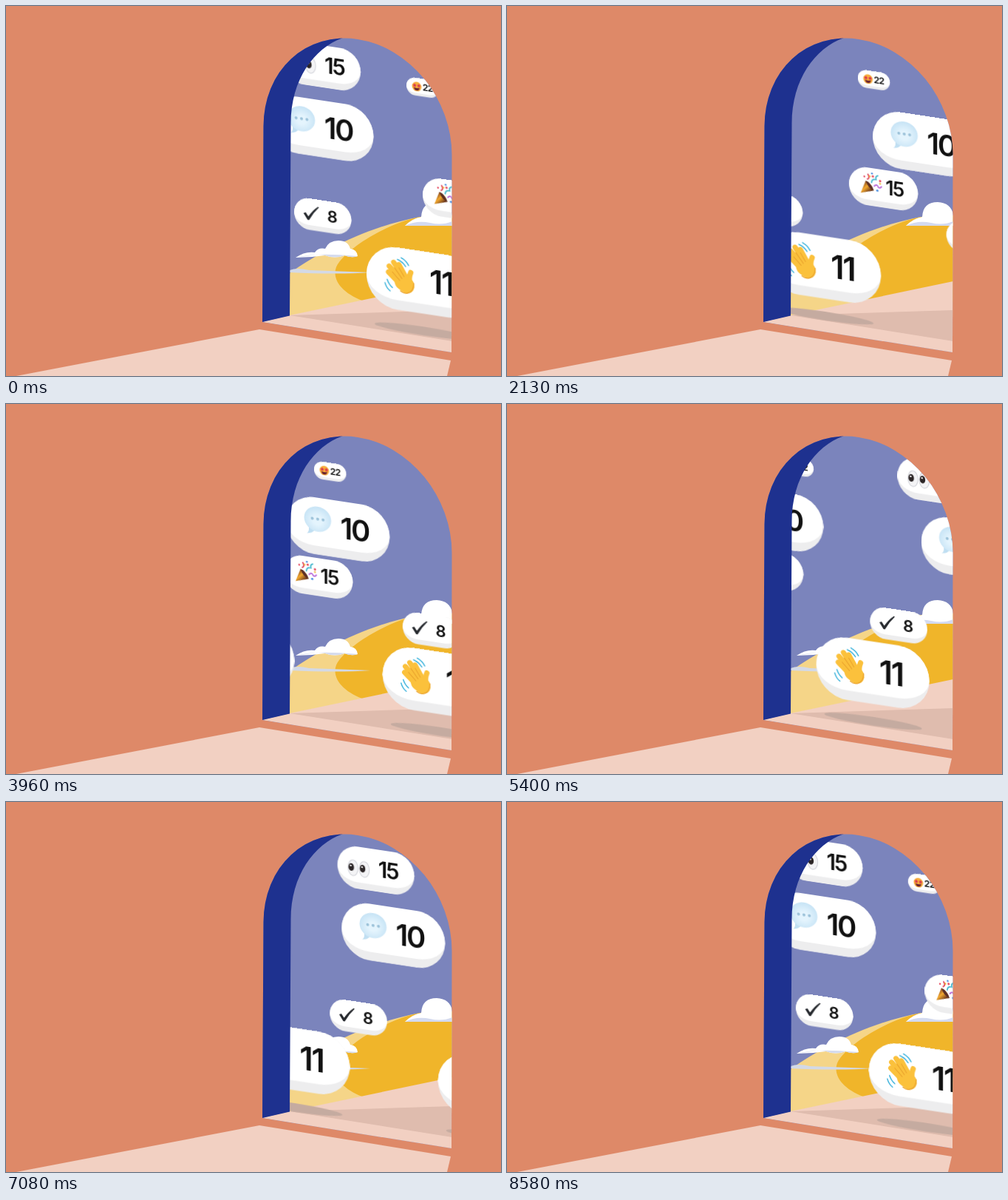
Recreate the animation shown at these times as an HTML page. Size 670 by 500 pixels, loop 8610 ms.

```html
<!DOCTYPE html>
<html lang="en">
<head>
<meta charset="utf-8">
<title>Reactions behind the arch</title>
<style>
  html, body { margin: 0; width: 100%; height: 100%; overflow: hidden; background: #de8968; }
  svg { display: block; width: 670px; height: 500px; }
  text { font: 600 43.5px Inter, "Liberation Sans", sans-serif; letter-spacing: -2.5px; text-anchor: middle; fill: #111; }
  .drift { animation: drift linear infinite; }
  @keyframes drift { to { transform: translateX(var(--shift)); } }
</style>
</head>
<body>
<svg viewBox="0 0 670 500">
  <defs>
    <clipPath id="arch">
      <path transform="matrix(1 .151 0 1 0 0)" d="M347 374.600L348.500 110A127.500 137 0 0 1 603.500 110L603 377Z"/>
    </clipPath>
    <radialGradient id="puff" cx=".5" cy=".55" r=".55">
      <stop offset=".3" stop-color="#e4f4fd"/>
      <stop offset="1" stop-color="#c6e3f5"/>
    </radialGradient>
    <linearGradient id="cone" x1="0" y1="0" x2="1" y2="1">
      <stop offset=".2" stop-color="#8a4b1c"/>
      <stop offset=".45" stop-color="#f3a92f"/>
      <stop offset=".75" stop-color="#6f3a1b"/>
    </linearGradient>

    <g id="pill">
      <rect width="153" height="84" rx="42" fill="#ededee"/>
      <path d="M0 42A42 42 0 0 1 42 0H111A42 42 0 0 1 153 42A42 29 0 0 1 111 71H42A42 29 0 0 1 0 42Z" fill="#fff"/>
    </g>

    <g id="eyes" transform="translate(42 43.500)">
      <g id="eye">
        <ellipse cx="-11" rx="10" ry="15.500" fill="#f4f4f6" stroke="#d3d4da" stroke-width="1.500"/>
        <ellipse cx="-14.500" cy="-1" rx="5.500" ry="7.500" fill="#2b2526"/>
        <circle cx="-15.500" cy="-4" r="1.800" fill="#fff"/>
      </g>
      <use href="#eye" x="22.500"/>
    </g>

    <g id="talk" transform="translate(46.500 31.500)">
      <path d="M-14 10Q-11 19-16 23Q-7 22-3 15Z" fill="#c0dff2"/>
      <ellipse rx="20" ry="18.500" fill="url(#puff)"/>
      <g fill="#9dc3da"><circle cx="-8" r="2.200"/><circle r="2.200"/><circle cx="8" r="2.200"/></g>
    </g>

    <g id="grin" transform="translate(49 40.500)">
      <circle r="22.500" fill="#f7ae3c"/>
      <path id="star" d="M-10-15L-7-9L-1-8L-5-3L-4 3L-10 0L-16 3L-15-3L-19-8L-13-9Z" fill="#d9364f"/>
      <use href="#star" x="20"/>
      <path d="M-14 5Q0 10 14 5Q12 19 0 19Q-12 19-14 5Z" fill="#6b2430"/>
    </g>

    <g id="party" transform="translate(49 35)">
      <path d="M-23 23L-12-5Q2 0 6 14Z" fill="url(#cone)"/>
      <path d="M-12-5Q-1-4 6 14Q-6 12-12-5Z" fill="#5b2f25"/>
      <g fill="none" stroke-width="3" stroke-linecap="round">
        <path d="M-8-9Q-2-13-7-20" stroke="#e0455a"/>
        <path d="M1-3Q2-12 11-11Q9-18 15-20" stroke="#49b9cf"/>
        <path d="M7 4Q13-3 16 5Q20 8 23 3" stroke="#b768d8"/>
      </g>
      <g fill="#e5485d"><circle cx="4" cy="-17" r="2.500"/><circle cx="20" cy="-9" r="2.500"/><circle cx="-15" cy="-14" r="2"/></g>
      <g fill="#4b8fe0"><circle cx="14" cy="13" r="2.500"/><circle cx="2" cy="-23" r="2"/></g>
      <g fill="#f0b63a"><circle cx="20" cy="-3" r="2"/><circle cx="-3" cy="-16" r="2"/></g>
    </g>

    <path id="tick" transform="translate(45 38.500)" d="M-20 3L-14 0L-7 10Q4-8 19-20L21-18Q6-2-5 19L-9 19Z" fill="#26292e"/>

    <g id="wave" transform="translate(45 38)" fill="none" stroke-linecap="round">
      <g stroke="#fbc13c">
        <path d="M-15-3L2 12M-14-11L5 8M-8-17L8 5M-1-15L11 5" stroke-width="7.500"/>
        <path d="M15-7Q12 0 14 8" stroke-width="7"/>
        <path d="M4 8L9 11" stroke-width="22"/>
      </g>
      <path d="M-10-4L0 6M-7-10L3 3M-1-11L6 0" stroke="#e8a02c" stroke-width="1"/>
      <path d="M1 20Q7 24 12 21Q19 17 19 7" stroke="#eba42f" stroke-width="1.300"/>
      <path d="M-3-22Q4-20 8-14M2-25Q9-22 12-16M-17 7Q-15 13-10 17M-20 12Q-18 19-13 22" stroke="#3fb4dc" stroke-width="1.600"/>
    </g>
  </defs>

  <path d="M14 500L343 437L602 479L597 500Z" fill="#f2d0c2"/>

  <g clip-path="url(#arch)">
    <rect x="340" y="40" width="270" height="430" fill="#7b84bc"/>
    <path d="M384 361C425 332 490 298 560 285L604 283V420H384Z" fill="#f5d588"/>
    <path d="M482 398C448 385 438 362 451 346C470 321 520 293 560 285L604 283V400Z" fill="#f0b52a"/>
    <path d="M346 427L384 418L604 372V470Z" fill="#f2d0c2"/>
    <path d="M384 418L604 411V453Z" fill="#dfbcae"/>

    <path d="M384 357Q394 353 410 357L493 360Q450 363 384 360Z" fill="#d3d9e6"/>
    <path d="M392 340Q405 331 418 333Q423 326 432 328Q437 317 450 317Q463 317 466 328Q475 329 476 338Q468 341 458 337Q445 342 432 337Q412 340 392 340Z" fill="#fff"/>
    <path d="M392 340Q420 334 432 337Q445 342 458 337Q468 341 476 338Q440 335 420 336Z" fill="#d5dbee"/>
    <path d="M540 297Q550 287 562 285Q563 265 583 265Q601 266 604 282V297Z" fill="#fff"/>
    <path d="M540 297Q556 289 574 293Q590 297 604 291V297Z" fill="#d3daf0"/>

    <g id="sky" transform="matrix(1 .151 0 1 0 0)"></g>

    <path d="M340 430V40H460L455 43.500C417 57 385 100 385.500 160L384 418.500L347 427Z" fill="#1e318f"/>
  </g>
</svg>
<script>
  // icon, count, start x, y, scale, travel, period in ms
  const pills = [
    ["eyes", 15, 376, -11.6, .68, 409, 8610],
    ["talk", 10, 357.5, 63.1, .915, 272.5, 4305],
    ["grin", 22, 542, 13.4, .285, 272, 8610],
    ["party", 15, 564, 144.5, .61, 408.5, 8610],
    ["tick", 8, 390, 198, .507, 272, 8610],
    ["wave", 11, 488, 246.4, 1, 272.5, 4305]
  ];

  const shadow = '<ellipse cx="77" cy="107.500" rx="66" ry="5.800" fill="#c5aba0"/>';

  const drawPill = (icon, count, x, y, scale) => `
    <g transform="translate(${x} ${y}) scale(${scale})">
      ${icon === "wave" ? shadow : ""}
      <use href="#pill"/><use href="#${icon}"/>
      <text x="101" y="54.5">${count}</text>
    </g>`;

  // A second copy, one travel behind, takes over when the cycle restarts.
  document.getElementById("sky").innerHTML = pills.map(([icon, count, x, y, scale, travel, ms]) => `
    <g class="drift" style="--shift:${-travel}px;animation-duration:${ms}ms">
      ${drawPill(icon, count, x, y, scale)}
      ${drawPill(icon, count, x + travel, y, scale)}
    </g>`).join("");
</script>
</body>
</html>
```
